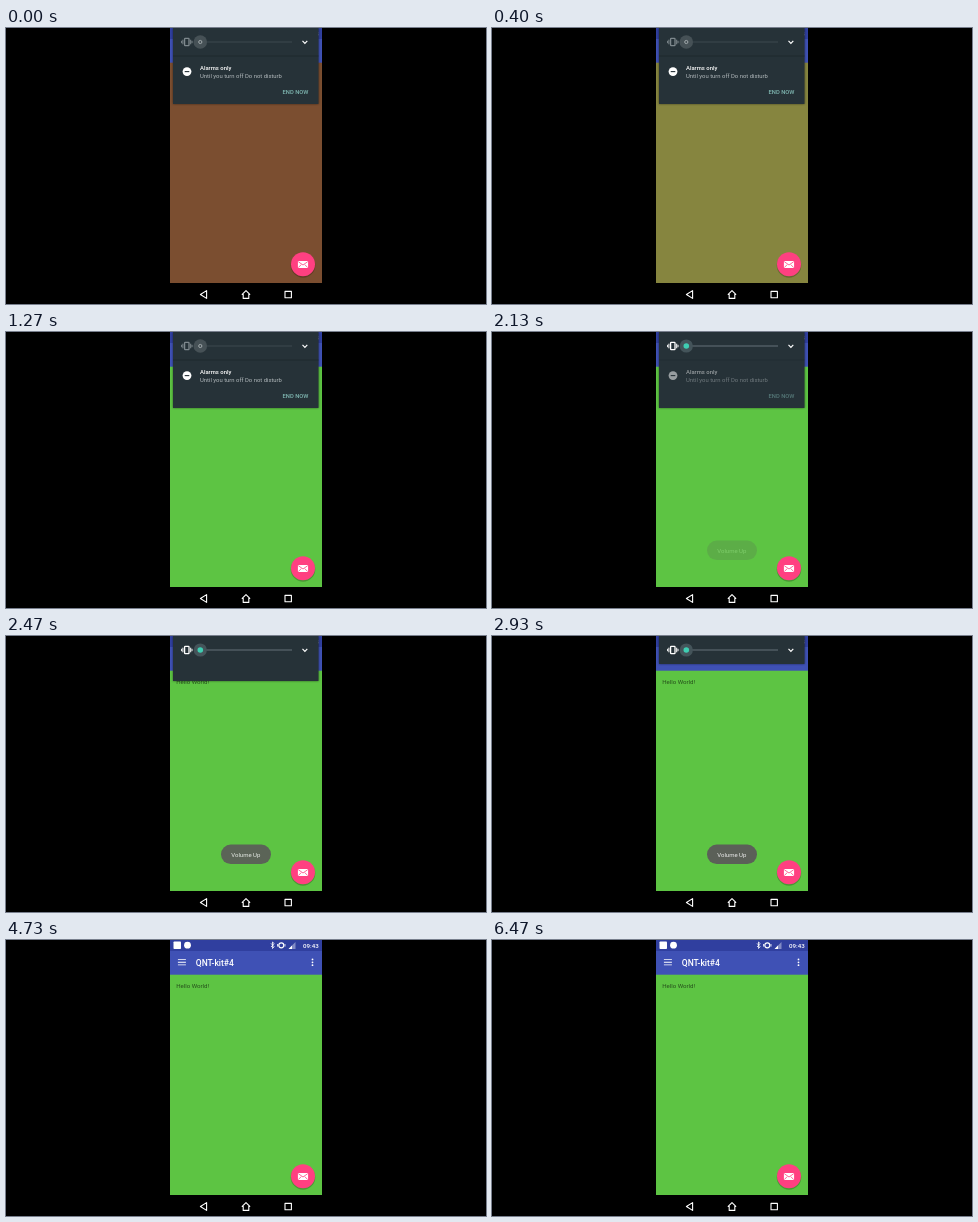
An HTML page that plays this animation: 480x276 px, repeating every 7.07 s.

```html
<!DOCTYPE html>
<html lang="en">
<head>
<meta charset="utf-8">
<title>Volume panel</title>
<style>
  html, body { margin: 0; width: 100%; height: 100%; overflow: hidden; background: #000; }
  svg { display: block; width: 100vw; height: 100vh; font-family: Roboto, sans-serif; }
  .page, .idle, .active, .zen, .panel, .sheet, .toast { animation: 7070ms linear infinite; }
  .page { animation-name: page; }
  .idle { animation-name: idle; animation-timing-function: step-end; }
  .active { animation-name: active; animation-timing-function: step-end; }
  .zen { animation-name: zen; }
  .panel { animation-name: dismiss; filter: drop-shadow(0 .8px 1.2px rgba(0, 0, 0, .5)); }
  .sheet { animation-name: collapse; }
  .toast { animation-name: toast; }

  @keyframes page {
    0%, 3.2% { fill: #7b4e30; }
    10.9%, 15.7% { fill: #9df860; }
    17.4%, 100% { fill: #5dc443; }
  }
  @keyframes idle { 0% { opacity: 1; } 28.28% { opacity: 0; } }
  @keyframes active { 0% { opacity: 0; } 28.28% { opacity: 1; } }

  /* The text fades for 300 ms, then the sheet shrinks for 300 ms. */
  @keyframes zen {
    0%, 28.1% { opacity: 1; }
    32.4%, 100% { opacity: 0; }
  }
  @keyframes collapse {
    0%, 32.4% { height: 76px; animation-timing-function: cubic-bezier(.37, 0, .63, 1); }
    36.7%, 100% { height: 28px; }
  }
  @keyframes dismiss {
    0%, 59.8% { transform: none; animation-timing-function: cubic-bezier(.75, 0, .92, .6); }
    64%, 100% { transform: translateY(-31px); }
  }
  @keyframes toast {
    0%, 29.3% { opacity: 0; animation-timing-function: cubic-bezier(.33, .67, .67, 1); }
    36.4%, 58.3% { opacity: 1; animation-timing-function: cubic-bezier(.33, 0, .67, .33); }
    65.4%, 100% { opacity: 0; }
  }
</style>
</head>
<body>
<svg viewBox="0 0 480 276">
  <defs>
    <clipPath id="screen"><rect x="164" width="152" height="276"/></clipPath>
    <g id="vibrate" fill="none" stroke="currentColor">
      <rect x="-2.2" y="-3.7" width="4.4" height="7.4" rx=".6" stroke-width="1.3"/>
      <path d="M-3.9-2.3V2.3M3.9-2.3V2.3M-5.2-1.2V1.2M5.2-1.2V1.2"/>
    </g>
  </defs>
  <rect width="480" height="276"/>

  <g clip-path="url(#screen)">
    <rect class="page" x="164" y="34" width="152" height="221"/>
    <text x="170.2" y="47.8" font-size="6.1" fill-opacity=".6">Hello World!</text>

    <!-- status and app bars -->
    <rect x="164" width="152" height="11" fill="#303f9f"/>
    <rect x="164" y="11" width="152" height="23.7" fill="#3f51b5"/>
    <g fill="#fff">
      <rect x="167.5" y="1.5" width="7.5" height="7.5" rx=".8"/>
      <circle cx="181.5" cy="5.2" r="3.4"/>
      <path d="M265 3.4l3.2 3.4-1.7 1.7V2l1.7 1.6L265 7" fill="none" stroke="#fff" stroke-width=".8"/>
      <circle cx="275.3" cy="5.3" r="2.5" fill="none" stroke="#fff" stroke-width="1.2"/>
      <path d="M271.5 4v2.6M279 4v2.6" stroke="#fff" stroke-width=".8"/>
      <path d="M289.5 2v7h-7z" fill-opacity=".4"/>
      <path d="M286 5.6V9h-3.4z"/>
      <text x="297" y="7.8" font-size="6.2" font-weight="500">09:43</text>
      <path d="M171.9 19.2h8v.9h-8zm0 2.6h8v.9h-8zm0 2.6h8v.9h-8z"/>
      <text x="189.8" y="26" font-size="8.5" font-weight="500">QNT-kit#4</text>
      <circle cx="306.5" cy="19.4" r=".9"/>
      <circle cx="306.5" cy="22.3" r=".9"/>
      <circle cx="306.5" cy="25.2" r=".9"/>
    </g>

    <!-- mail button -->
    <circle cx="297" cy="237.4" r="12.3" fill-opacity=".22"/>
    <circle cx="297" cy="236.2" r="12" fill="#ff4081"/>
    <rect x="291.9" y="232.9" width="10.2" height="7.2" rx=".9" fill="#fff"/>
    <path d="M292.3 233.7l4.7 3.3 4.7-3.3M292.3 239.6l2.9-3M301.7 239.6l-2.9-3" fill="none" stroke="#ff4081" stroke-width=".8"/>

    <g class="toast">
      <rect x="215" y="208.6" width="50" height="19.4" rx="9.7" fill="#5b6058"/>
      <text x="225.3" y="220.5" font-size="6" fill="#eee">Volume Up</text>
    </g>

    <g class="panel">
      <rect class="sheet" x="167" width="145.5" height="76" fill="#263238"/>
      <g class="idle">
        <use href="#vibrate" x="180.8" y="14" color="#7e888d"/>
        <path d="M201 14h85" stroke="#3c484e"/>
        <circle cx="194.3" cy="14" r="6.8" fill="#465156"/>
        <circle cx="194.3" cy="14" r="1.6" fill="none" stroke="#a0a8ab" stroke-width="1"/>
      </g>
      <g class="active">
        <use href="#vibrate" x="180.8" y="14" color="#fff"/>
        <path d="M196 14h90" stroke="#657178"/>
        <circle cx="194.3" cy="14" r="6.6" fill="#44545a"/>
        <circle cx="194.3" cy="14" r="2.8" fill="#3fcdb2"/>
      </g>
      <path d="M296.5 12.9l2.4 2.4 2.4-2.4" fill="none" stroke="#fff" stroke-width="1.2"/>
      <g class="zen">
        <path d="M167 28h145.5" stroke="#1d272c" stroke-width=".8"/>
        <circle cx="181" cy="43.6" r="4.4" fill="#fff"/>
        <path d="M178.7 43.6h4.6" stroke="#263238" stroke-width="1.1"/>
        <text x="194" y="42" font-size="5.9" font-weight="500" fill="#fff">Alarms only</text>
        <text x="194" y="50.3" font-size="5.9" fill="#b3babd">Until you turn off Do not disturb</text>
        <text x="276.6" y="65.6" font-size="5.8" font-weight="500" fill="#80b9b3">END NOW</text>
      </g>
    </g>

    <!-- navigation bar -->
    <rect x="164" y="255" width="152" height="21"/>
    <g fill="none" stroke="#fff" stroke-width="1.1" stroke-linejoin="round">
      <path d="M200.6 262.6v7.8l-6.2-3.9z"/>
      <path d="M236.2 266.4l3.8-3.8 3.8 3.8h-1v4h-5.6v-4z"/>
      <rect x="279" y="263.4" width="6.4" height="6.4"/>
    </g>
  </g>
</svg>
</body>
</html>
```
